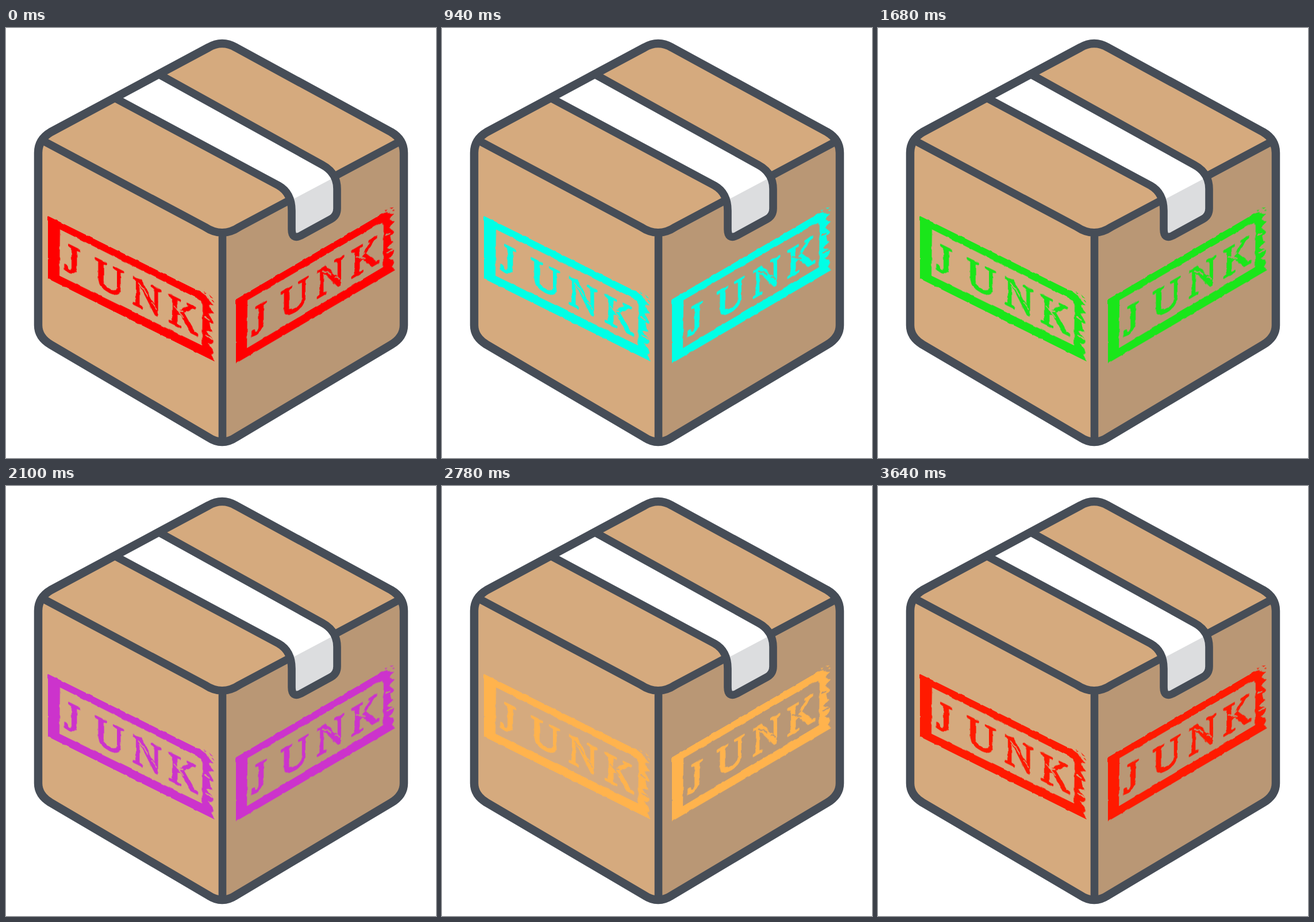
An HTML page for the animation above (3700 ms loop, 748 by 748 pixels).

```html
<!DOCTYPE html>
<html lang="en">
<head>
<meta charset="utf-8">
<title>Junk box</title>
<style>
  html, body { margin: 0; height: 100%; overflow: hidden; background: #fff; }
  svg { display: block; width: 100%; height: 100%; }
  .line { fill: none; stroke: #464d57; stroke-width: 13.6; stroke-linejoin: round; }
  .outer { stroke-width: 14.5; }
  .ink { fill: currentColor; }
  .letters {
    font: 71px "Liberation Serif", "Times New Roman", serif;
    text-anchor: middle; stroke: currentColor; stroke-width: 2.8; stroke-linejoin: round;
  }
  .cracks { fill: none; stroke: var(--face); stroke-width: 2; }
  .left { --face: #d5aa7e; }
  .right { --face: #b99775; }
</style>
</head>
<body>
<svg id="stage" viewBox="0 0 748 748" color="#f00">
  <defs>
    <path id="hull" d="M352 34Q376 20 400 34L670 181Q692 194 692 217V517Q692 538 670 551L400 712Q376 728 352 712L78 551Q56 538 56 517V217Q56 194 78 181Z"/>
    <path id="tape" d="M188 121L474 274Q497 287 497 318V350Q497 369 513 361L566 332Q576 326 576 314V280Q576 252 550 238L265 80"/>
    <clipPath id="inHull"><use href="#hull"/></clipPath>
    <filter id="worn" color-interpolation-filters="sRGB">
      <feTurbulence type="fractalNoise" baseFrequency=".1" numOctaves="2" seed="4"/>
      <feDisplacementMap in="SourceGraphic" scale="3.5" xChannelSelector="R" yChannelSelector="G"/>
    </filter>

    <!-- Flat stamp, slanted onto each side of the box -->
    <g id="stamp" filter="url(#worn)">
      <path class="ink" fill-rule="evenodd" d="M0 0L266 0Q277 1 281 8L288 12 280 16 283 23 289 27 279 31 286 37 288 44 281 47 283 55 287 59 276 63 282 69 288 75 286 81 278 84 287 89 289 96 284 100 290 109 0 109Z
        M21 13L262 14Q269 15 269 23L268 92 20 94Z"/>
      <path class="ink" d="M271-4l5 2-3 1zM280-3l7 4-4 0zM284 4l5 3-4 0z"/>
      <text class="ink letters" x="42 107 172 235" y="79.5">JUNK</text>
      <path class="cracks" d="M157 38l9 7 8 8M180 61l9 8M218 47l9 5 8-3M226 39l3 16 7 5M274 70l11 3M272 40l10 2"/>
    </g>
  </defs>

  <use href="#hull" fill="#d5aa7e"/>
  <path clip-path="url(#inHull)" fill="#b99775" d="M376 356L406 346 692 193V560L376 740Z"/>
  <path class="line" d="M66 197L346 346Q376 366 406 346L684 198M376.5 356V718"/>
  <use href="#tape" fill="#fff"/>
  <path fill="#dcdddf" d="M499 298L567 262 576 280V324L506 361 497 350Z"/>
  <use href="#tape" class="line"/>
  <use href="#hull" class="line outer"/>

  <use href="#stamp" class="left" transform="matrix(1 .497 0 1 73 327)"/>
  <use href="#stamp" class="right" transform="matrix(.955 -.559 0 1.02 400 472)"/>
</svg>
<script>
  const INKS = [[255, 0, 0], [0, 255, 255], [0, 255, 0], [255, 0, 255], [255, 255, 0]];
  const PERIOD = 740, HOLD = 200, STEP = 60;
  const stage = document.getElementById("stage");

  // Each ink holds, then moves to the next one in ten equal steps.
  function draw() {
    const time = performance.now() % (PERIOD * INKS.length);
    const index = Math.floor(time / PERIOD);
    const step = Math.floor((time % PERIOD - HOLD) / STEP) + 1;
    const mix = Math.max(0, step) / 10;
    const next = INKS[(index + 1) % INKS.length];
    const ink = INKS[index].map((c, i) => Math.round(c + (next[i] - c) * mix));
    stage.style.color = `rgb(${ink})`;
    requestAnimationFrame(draw);
  }
  draw();
</script>
</body>
</html>
```
